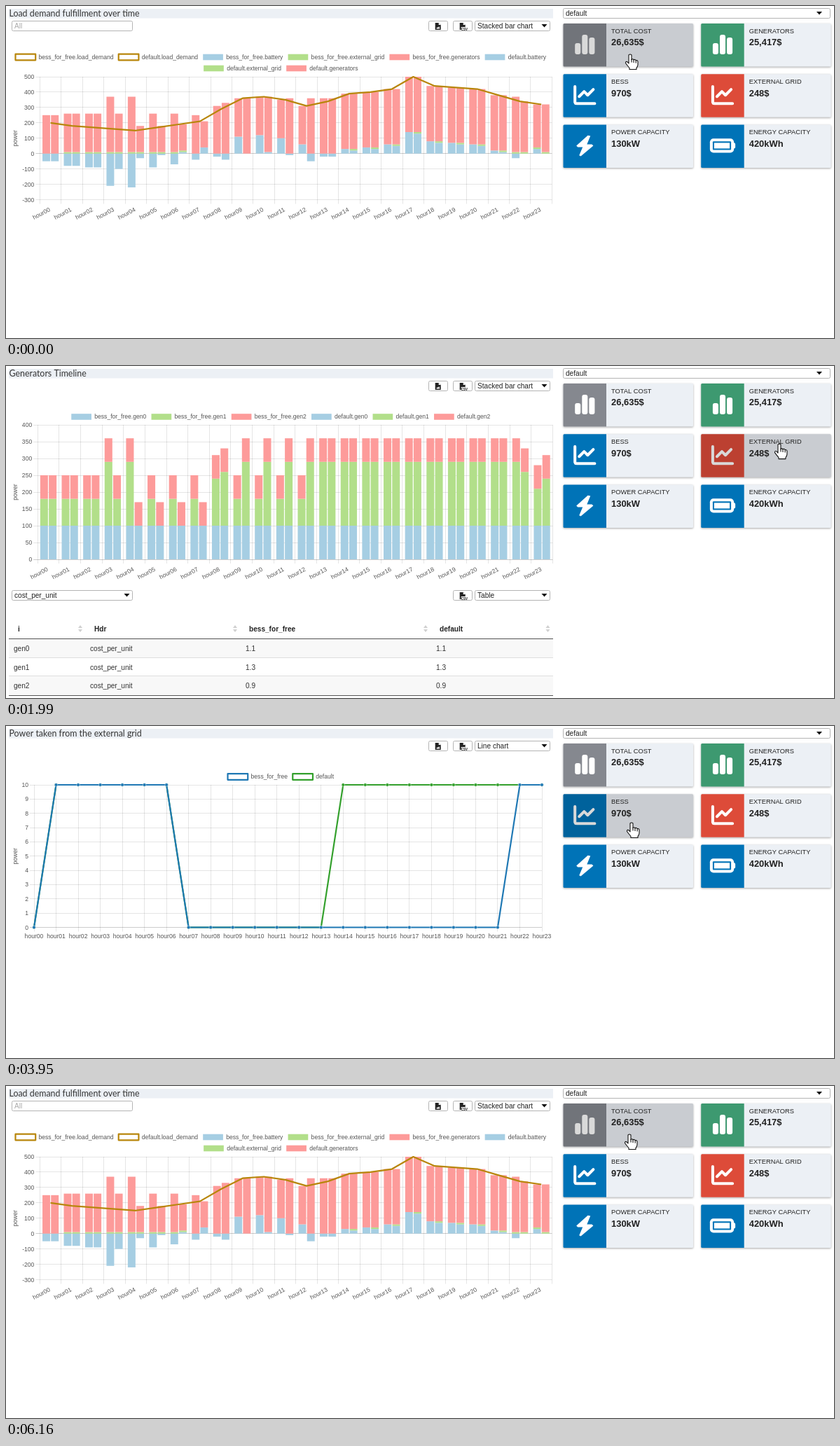
These frames come from a looping animation (1182x474 px, 6480 ms). An HTML page with a canvas:

```html
<!DOCTYPE html>
<html lang="en">
<head>
<meta charset="utf-8">
<title>Energy dashboard</title>
<style>
  html, body { margin: 0; width: 100%; height: 100%; overflow: hidden; background: #fff; }
  canvas { display: block; }
</style>
</head>
<body>
<canvas id="stage" width="1182" height="474"></canvas>
<script>
const ctx = document.getElementById('stage').getContext('2d');
const LOOP = 6480;
const SANS = '"Liberation Sans", Arial, sans-serif';
const BLUE = '#a6cee3', GREEN = '#b2df8a', RED = '#fd9b9a';
const DEEP_BLUE = '#1f78b4', DEEP_GREEN = '#33a02c', GOLD = '#b8860b';

// Hourly data: generators always cover what battery and grid leave open.
const hours = Array.from({ length: 24 }, (_, i) => 'hour' + String(i).padStart(2, '0'));
const load = [200, 180, 170, 160, 150, 170, 190, 210, 290, 360, 370, 350,
  310, 340, 390, 400, 420, 500, 440, 430, 420, 380, 340, 320];
const scenario = (name, battery, hasGrid) => {
  const grid = load.map((_, i) => hasGrid(i) ? 10 : 0);
  const generators = load.map((v, i) => v - battery[i] - grid[i]);
  return { name, battery, grid, generators };
};
const scenarios = [
  scenario('bess_for_free', [-50, -80, -90, -210, -220, -90, -70, -40, -20, 110, 120, 100,
    60, -20, 30, 40, 60, 140, 80, 70, 60, 20, -30, 30], i => (i > 0 && i < 7) || i > 21),
  scenario('default', [-50, -80, -90, -100, -30, -10, 10, 40, -40, 0, 10, -10,
    -50, -20, 20, 30, 50, 130, 70, 60, 50, 10, 0, 0], i => (i > 0 && i < 7) || i > 13),
];

function text(str, x, y, { size = 10.1, color = '#333', align = 'left', weight = '', family = SANS } = {}) {
  ctx.font = `${weight} ${size}px ${family}`;
  ctx.fillStyle = color;
  ctx.textAlign = align;
  ctx.textBaseline = 'alphabetic';
  ctx.fillText(str, x, y);
}

function rect(x, y, w, h, color) {
  ctx.fillStyle = color;
  ctx.fillRect(x, y, w, h);
}

function roundRect(x, y, w, h, r, fill, stroke) {
  ctx.beginPath();
  ctx.roundRect(x, y, w, h, r);
  if (fill) { ctx.fillStyle = fill; ctx.fill(); }
  if (stroke) { ctx.strokeStyle = stroke; ctx.lineWidth = 1; ctx.stroke(); }
}

function polyline(points, color, width) {
  ctx.beginPath();
  points.forEach(([x, y]) => ctx.lineTo(x, y));
  ctx.strokeStyle = color;
  ctx.lineWidth = width;
  ctx.lineJoin = 'round';
  ctx.stroke();
}

function polygon(points, color) {
  ctx.beginPath();
  points.forEach(([x, y]) => ctx.lineTo(x, y));
  ctx.fillStyle = color;
  ctx.fill();
}

// ---- Form controls ----
function field(x, y, w, label, color) {
  roundRect(x + .5, y + .5, w - 1, 14, 2, '#fff', '#b4b4b4');
  text(label, x + 4, y + 11, { color });
}

function select(x, y, w, label, arrowInset = 8.5) {
  field(x, y, w, label, '#222');
  const ax = x + w - arrowInset, ay = y + 5;
  polygon([[ax - 4, ay], [ax + 4, ay], [ax, ay + 4.6]], '#111');
}

function fileButton(x, y, isCsv) {
  roundRect(x + .5, y + .5, 27, 14, 2, '#fff', '#b4b4b4');
  const fx = x + 9.7, fy = y + 3;
  polygon([[fx, fy], [fx + 5, fy], [fx + 8, fy + 3], [fx + 8, fy + 10], [fx, fy + 10]], '#222');
  polygon([[fx + 5, fy], [fx + 5, fy + 3], [fx + 8, fy + 3]], '#fff');
  if (isCsv) {
    rect(fx + 2, fy + 6, 8, 5, '#fff');
    text('CSV', fx + 2, fy + 10.5, { size: 4.5, weight: 'bold', color: '#111' });
  } else {
    polygon([[fx + 1.5, fy + 8.5], [fx + 3, fy + 6], [fx + 4, fy + 7], [fx + 5.5, fy + 5], [fx + 6.7, fy + 8.5]], '#fff');
  }
}

function panelHeader(title, chartType) {
  rect(4, 4, 777, 13.5, '#ecf0f5');
  text(title, 4.5, 15, { size: 12.4, family: 'Lato, sans-serif' });
  fileButton(603, 21, false);
  fileButton(638, 21, true);
  select(669, 21, 108, chartType);
}

// ---- Charts ----
const CHART_FONT = { size: 8.6, color: '#555' };

function legend(items, y) {
  const BOX = 28.7, GAP = 4.3, PAD = 7.2;
  ctx.font = `${CHART_FONT.size}px ${SANS}`;
  const widths = items.map(item => BOX + GAP + ctx.measureText(item.label).width);
  let x = 392.3 - (widths.reduce((a, b) => a + b) + PAD * (items.length - 1)) / 2;
  items.forEach(({ label, color, outline }, i) => {
    if (outline) {
      ctx.strokeStyle = color;
      ctx.lineWidth = 2.2;
      ctx.strokeRect(x, y - 4.3, BOX, 8.6);
    } else {
      rect(x, y - 4.3, BOX, 8.6, color);
    }
    text(label, x + BOX + GAP, y + 2.8, CHART_FONT);
    x += widths[i] + PAD;
  });
}

function axes({ left, right, top, bottom, min, max, step, bars }) {
  const slot = (right - left) / (bars ? 24 : 23);
  const px = i => left + (i + (bars ? .5 : 0)) * slot;
  const py = v => bottom - (v - min) / (max - min) * (bottom - top);
  for (let v = min; v <= max; v += step) {
    rect(left - 6, Math.floor(py(v)), right - left + 6, 1, v === 0 ? 'rgba(0,0,0,.2)' : 'rgba(0,0,0,.1)');
    text(v, left - 8, py(v) + 3, { ...CHART_FONT, align: 'right' });
  }
  for (let i = 0; i < (bars ? 25 : 24); i++) {
    rect(Math.floor(left + i * slot), top, 1, bottom - top + 6, 'rgba(0,0,0,.1)');
  }
  hours.forEach((hour, i) => {
    if (!bars) return text(hour, px(i), bottom + 15.5, { ...CHART_FONT, align: 'center' });
    ctx.save();
    ctx.translate(px(i) - 1.3, bottom + 13.5);
    ctx.rotate(-.48);
    text(hour, 0, 3, { ...CHART_FONT, align: 'right' });
    ctx.restore();
  });
  ctx.save();
  ctx.translate(13, (top + bottom) / 2);
  ctx.rotate(-Math.PI / 2);
  text('power', 0, 2.5, { ...CHART_FONT, align: 'center' });
  ctx.restore();
  return { px, py, slot };
}

// layers(scenario, hour) lists the stacked values from the axis outwards.
function stackedBars({ px, py, slot }, layers) {
  const half = slot * .4, width = half * .9;
  scenarios.forEach((s, side) => hours.forEach((_, i) => {
    const x = px(i) + (side - 1) * half + half * .05;
    let up = 0;
    layers(s, i).forEach((value, k) => {
      const base = value < 0 ? 0 : up;
      const y0 = py(base), y1 = py(base + value);
      rect(x, Math.min(y0, y1), width, Math.abs(y1 - y0), [BLUE, GREEN, RED][k]);
      if (value > 0) up += value;
    });
  }));
}

function lineSeries({ px, py }, key) {
  [[scenarios[1], DEEP_GREEN], [scenarios[0], DEEP_BLUE]].forEach(([s, color]) => {
    const points = s[key].map((v, i) => [px(i), py(v)]);
    polyline(points, color, 2.15);
    points.forEach(([x, y]) => {
      ctx.beginPath();
      ctx.arc(x, y, 2.3, 0, 7);
      ctx.fillStyle = color;
      ctx.fill();
      ctx.strokeStyle = 'rgba(255,255,255,.6)';
      ctx.lineWidth = .7;
      ctx.stroke();
    });
  });
}

const fills = (s, names) => names.map((n, i) => ({ label: `${s.name}.${n}`, color: [BLUE, GREEN, RED][i] }));

// ---- Views ----
function loadView() {
  panelHeader('Load demand fulfillment over time', 'Stacked bar chart');
  field(8, 21, 173, 'All', '#aaa');
  const parts = ['battery', 'external_grid', 'generators'];
  const items = [
    ...scenarios.map(s => ({ label: s.name + '.load_demand', color: GOLD, outline: true })),
    ...scenarios.flatMap(s => fills(s, parts)),
  ];
  legend(items.slice(0, 6), 73);
  legend(items.slice(6), 89);
  const scale = axes({ left: 48.4, right: 779.4, top: 101, bottom: 276.5, min: -300, max: 500, step: 100, bars: true });
  stackedBars(scale, (s, i) => [s.battery[i], s.grid[i], s.generators[i]]);
  polyline(load.map((v, i) => [scale.px(i), scale.py(v)]), GOLD, 2.2);
}

function generatorChart() {
  panelHeader('Generators Timeline', 'Stacked bar chart');
  legend(scenarios.flatMap(s => fills(s, ['gen0', 'gen1', 'gen2'])), 72.5);
  const scale = axes({ left: 45.2, right: 780.4, top: 84, bottom: 276, min: 0, max: 400, step: 50, bars: true });
  stackedBars(scale, (s, i) => [100, s.generators[i] - 170, 70]);
}

function costTable() {
  select(8, 320, 173, 'cost_per_unit');
  fileButton(638, 320, true);
  select(669, 320, 108, 'Table');
  [['i', 17], ['Hdr', 126], ['bess_for_free', 347], ['default', 619]].forEach(([label, x]) =>
    text(label, x, 379, { weight: 'bold', color: '#222' }));
  [106, 327, 599, 773.5].forEach(x => {
    polygon([[x - 3, 374], [x + 3, 374], [x, 370]], '#d0d0d0');
    polygon([[x - 3, 376], [x + 3, 376], [x, 380]], '#d0d0d0');
  });
  ['1.1', '1.3', '0.9'].forEach((cost, i) => {
    const y = 390 + i * 26.7;
    rect(4, y, 777, 26.7, i % 2 ? '#fff' : '#f8f8f8');
    if (i) rect(4, Math.round(y) - 1, 777, 1, '#ddd');
    ['gen' + i, 'cost_per_unit', cost, cost].forEach((cell, k) => text(cell, [11, 120, 342, 614][k], y + 17));
  });
  rect(4, 389, 777, 1, '#555');
  rect(4, 470, 777, 1, '#555');
}

function lineView(title, key, axis) {
  panelHeader(title, 'Line chart');
  legend(scenarios.map((s, i) => ({ label: s.name, color: [DEEP_BLUE, DEEP_GREEN][i], outline: true })), 72.5);
  lineSeries(axes({ right: 765, top: 84, bottom: 287.5, ...axis }), key);
}

const gridView = () => lineView('Power taken from the external grid', 'grid',
  { left: 40, min: 0, max: 10, step: 1 });
const batteryView = () => lineView('Charge/Discharge of the BESS', 'battery',
  { left: 48, min: -250, max: 150, step: 50 });
const generatorView = () => { generatorChart(); costTable(); };

// The new panel briefly pushes the previous one down.
function gridOverGenerators() {
  gridView();
  ctx.save();
  ctx.translate(0, 313);
  generatorChart();
  ctx.restore();
}

const views = [[0, loadView], [1180, generatorView], [2710, gridOverGenerators],
  [2850, gridView], [4420, batteryView], [6060, loadView]];

// ---- Cards; icons are drawn on a 512-unit grid around the tile centre ----
function barsIcon() {
  [[-224, -32], [-64, -224], [96, -160]].forEach(([x, y]) => roundRect(x, y, 128, 224 - y, 48, '#fff'));
}
function trendIcon() {
  ctx.lineCap = 'round';
  polyline([[-224, -192], [-224, 160], [-210, 188], [-176, 192], [224, 192]], '#fff', 64);
  polyline([[-128, 32], [-16, -80], [64, 0], [192, -128]], '#fff', 64);
  ctx.lineCap = 'butt';
}
function boltIcon() {
  const outline = [[85, -224], [-160, -8], [-32, 0], [-117, 224], [160, 8], [32, 0]];
  polygon(outline, '#fff');
  polygon([[68, -232], [-192, 0], [-160, 32], [-48, 32], [-128, 220], [-92, 240], [192, 0], [160, -32], [48, -32], [126, -220]], '#fff');
}
function batteryIcon() {
  roundRect(-288, -160, 544, 320, 80, '#fff');
  roundRect(224, -64, 64, 128, 32, '#fff');
  roundRect(-224, -96, 416, 192, 16, '#0073b7');
  rect(-192, -64, 352, 128, '#fff');
}

const cards = [
  ['TOTAL COST', '26,635$', '#85888f', barsIcon],
  ['GENERATORS', '25,417$', '#3d9970', barsIcon],
  ['BESS', '970$', '#0073b7', trendIcon],
  ['EXTERNAL GRID', '248$', '#dd4b39', trendIcon],
  ['POWER CAPACITY', '130kW', '#0073b7', boltIcon],
  ['ENERGY CAPACITY', '420kWh', '#0073b7', batteryIcon],
];

function drawCard([label, value, color, icon], index, [mx, my]) {
  const x = 795.5 + index % 2 * 196.7, y = 25 + Math.floor(index / 2) * 72.2, w = 185.5, h = 61.5;
  ctx.save();
  ctx.shadowColor = 'rgba(0,0,0,.35)';
  ctx.shadowBlur = 3;
  ctx.shadowOffsetY = 1;
  roundRect(x, y, w, h, 1.5, '#ecf0f5');
  ctx.restore();
  roundRect(x, y, 61.5, h, [1.5, 0, 0, 1.5], color);
  ctx.save();
  ctx.translate(x + 30.8, y + 30);
  ctx.scale(.063, .063);
  icon();
  ctx.restore();
  if (mx > x && mx < x + w && my > y && my < y + h) roundRect(x, y, w, h, 1.5, 'rgba(0,0,0,.15)');
  text(label, x + 68.5, y + 13.5, { size: 9.3, color: '#222' });
  text(value, x + 68.5, y + 31.3, { size: 12.95, weight: 'bold', color: '#222' });
}

// ---- Pointer: [time, x, y] of the fingertip ----
const pointerPath = [
  [300, 891, 69], [600, 1000, 73], [890, 1098, 67], [959, 1098, 67], [960, 1104, 66],
  [1790, 1104, 66], [1990, 1104, 111], [2320, 1099, 138], [2650, 1098, 138],
  [3320, 1098, 138], [3540, 1002, 142], [3950, 893, 138], [4080, 891, 138], [4360, 889, 138],
  [5010, 889, 138], [5560, 891, 69], [5960, 890, 69], [6479, 890, 69], [LOOP, 891, 69],
];

function pointerAt(t) {
  const i = pointerPath.findIndex(p => p[0] > t);
  if (i === 0) return pointerPath[0].slice(1);
  const [t0, x0, y0] = pointerPath[i - 1], [t1, x1, y1] = pointerPath[i];
  const k = (t - t0) / (t1 - t0);
  return [x0 + (x1 - x0) * k, y0 + (y1 - y0) * k];
}

const handShape = new Path2D('M-2 1Q0-1 2 1V7.5Q3.5 6 5 7.8Q6.8 6.6 8.2 8.6Q10.5 8 11 10.5' +
  'V15Q10.6 18 9 19.5V21.5H-1V19.5Q-4 16-6.5 12.5Q-6.5 9.5-4 10.8L-2 13Z');
const handCreases = new Path2D('M2 7V11.5M5 8V12M8.2 9V12.5');

function drawPointer([x, y]) {
  ctx.save();
  ctx.translate(x, y);
  ctx.lineJoin = 'round';
  ctx.lineWidth = 1.1;
  ctx.fillStyle = '#fff';
  ctx.strokeStyle = '#111';
  ctx.fill(handShape);
  ctx.stroke(handShape);
  ctx.stroke(handCreases);
  ctx.restore();
}

function draw(now) {
  const t = now % LOOP;
  rect(0, 0, 1182, 474, '#fff');
  views.filter(([start]) => start <= t).pop()[1]();
  select(795, 3, 382, 'default', 16);
  const pointer = pointerAt(t);
  cards.forEach((card, i) => drawCard(card, i, pointer));
  drawPointer(pointer);
}

const start = performance.now();
function tick() {
  draw(performance.now() - start);
  requestAnimationFrame(tick);
}
tick();
</script>
</body>
</html>
```
